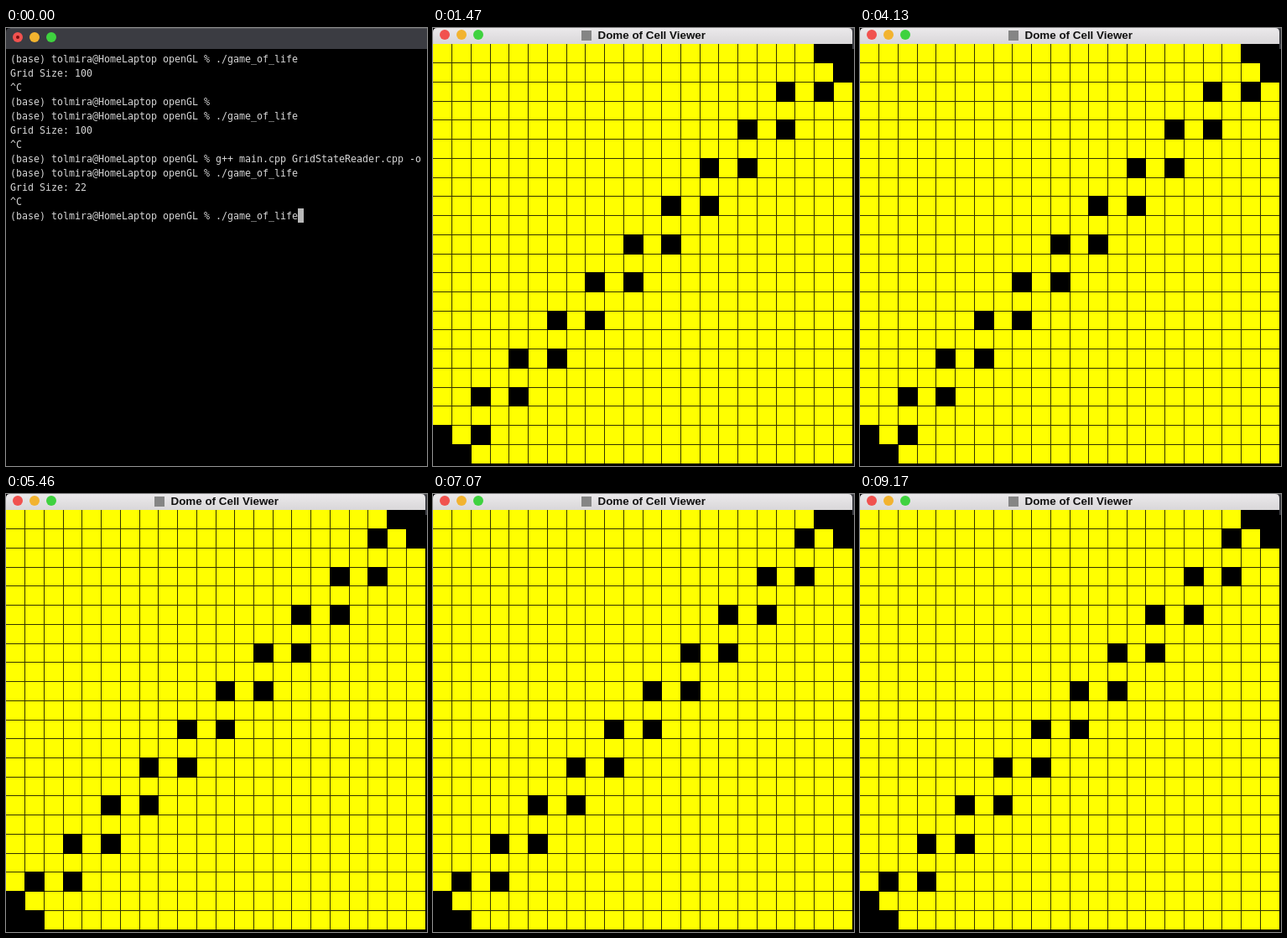
These frames come from a looping animation (502x522 px, 9310 ms). An HTML page:

```html
<!DOCTYPE html>
<html lang="en">
<head>
<meta charset="utf-8">
<title>Cell grid</title>
<style>
  html, body { margin: 0; width: 100%; height: 100%; overflow: hidden; background: #000; }
  svg { display: block; width: 502px; height: 522px; }
  .shell { font: 11.63px "DejaVu Sans Mono", "Liberation Mono", monospace; fill: #d6d6d6; white-space: pre; }
  .title { font: bold 13.4px "Liberation Sans", Arial, sans-serif; fill: #111; }
</style>
</head>
<body>
<svg id="stage" viewBox="0 0 502 522" xmlns="http://www.w3.org/2000/svg">
  <defs>
    <linearGradient id="lightBar" x2="0" y2="1">
      <stop offset="0" stop-color="#ebe9eb"/>
      <stop offset="1" stop-color="#d9d7d9"/>
    </linearGradient>
  </defs>
  <rect width="502" height="522"/>
  <g id="terminal">
    <path d="M0 25V5Q0 0 5 0H502V25Z" fill="#3b3c42"/>
    <path d="M5 .5H502" stroke="#55565b"/>
  </g>
  <g id="viewer">
    <path d="M0 19V5Q0 0 5 0H495Q500 0 500 5V19Z" fill="url(#lightBar)"/>
    <rect x="177" y="3" width="12" height="12" fill="#858585"/>
    <text class="title" x="196.5" y="13">Dome of Cell Viewer</text>
    <rect y="19" width="500" height="500" fill="#ff0"/>
    <path id="lines" stroke="#333300" fill="none"/>
    <path id="cells"/>
  </g>
</svg>
<script>
const LOOP = 9310, TICK = 70, TICKS_PER_GENERATION = 3.8;
const COUNT = 22, TOP = 19, SIZE = 500 / COUNT;
const byId = id => document.getElementById(id);
const terminal = byId('terminal'), viewer = byId('viewer');

function add(parent, tag, attributes, text = '') {
  const node = document.createElementNS('http://www.w3.org/2000/svg', tag);
  for (const [key, value] of Object.entries(attributes)) node.setAttribute(key, value);
  node.textContent = text;
  parent.append(node);
}

function addLights(parent, cy) {
  ['#f1524f', '#f2b32f', '#3fd23f'].forEach((fill, i) =>
    add(parent, 'circle', { cx: 14 + 20 * i, cy, r: 6, fill }));
}

const prompt = '(base) tolmira@HomeLaptop openGL % ';
const run = prompt + './game_of_life';
const shellLines = [
  run, 'Grid Size: 100', '^C',
  prompt,
  run, 'Grid Size: 100', '^C',
  prompt + 'g++ main.cpp GridStateReader.cpp -o',
  run, 'Grid Size: 22', '^C',
  run
];

addLights(terminal, 11);
add(terminal, 'circle', { cx: 14, cy: 11, r: 2, fill: '#7a0f10' });
shellLines.forEach((line, i) =>
  add(terminal, 'text', { class: 'shell', x: 5, y: 41 + 17 * i }, line));
add(terminal, 'rect', { x: 348, y: 215, width: 7, height: 17, fill: '#b8b8b8' });
addLights(viewer, 8);

const edgeX = i => Math.floor(i * SIZE);
const edgeY = i => Math.floor(TOP + i * SIZE);

let linePath = '';
for (let i = 1; i < COUNT; i++) {
  linePath += `M${edgeX(i) + .5} ${TOP}V519M0 ${edgeY(i) + .5}H500`;
}
byId('lines').setAttribute('d', linePath);

function cellPath(row, col) {
  const right = Math.min(edgeX(col + 1) + 1, 500);
  const bottom = Math.min(edgeY(row + 1) + 1, 519);
  return `M${edgeX(col)} ${edgeY(row)}H${right}V${bottom}H${edgeX(col)}Z`;
}

// A barber pole: fixed corners and pairs on alternating rows.
function polePath(firstRow) {
  const cells = [[0, 20], [0, 21], [1, 21], [20, 0], [21, 0], [21, 1]];
  for (let row = firstRow; row <= 20; row += 2) cells.push([row, 20 - row], [row, 22 - row]);
  return cells.map(([row, col]) => cellPath(row, col)).join('');
}
const poles = [polePath(1), polePath(2)];

function draw(time) {
  const tick = Math.floor((time % LOOP) / TICK);
  const generation = Math.ceil((tick - 1.3) / TICKS_PER_GENERATION) - 1;
  viewer.style.display = tick < 3 ? 'none' : '';
  byId('cells').setAttribute('d', poles[Math.abs(generation % 2)]);
}

const start = performance.now();
function frame() {
  draw(performance.now() - start);
  requestAnimationFrame(frame);
}
frame();
</script>
</body>
</html>
```
